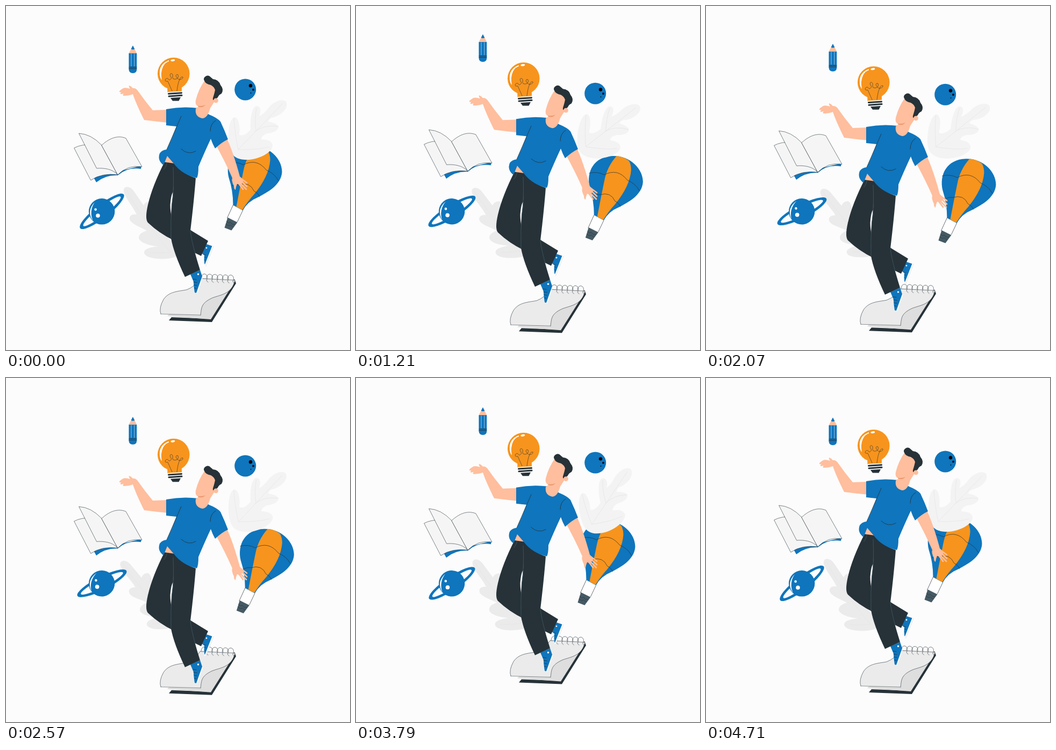
An HTML page with a canvas for the animation above (4780 ms loop, 640 px wide and 640 px high).

```html
<!DOCTYPE html>
<html lang="en">
<head>
<meta charset="utf-8">
<title>Floating ideas</title>
<style>
html, body { margin: 0; width: 100%; height: 100%; overflow: hidden; background: #fcfcfc; }
canvas { display: block; width: 100vmin; height: 100vmin; }
</style>
</head>
<body>
<canvas id="stage" width="640" height="640"></canvas>
<script>
const ctx = document.getElementById('stage').getContext('2d');
const LOOP = 4780, FRAME = 70, LEAD = 50, TAU = Math.PI * 2;
const BLUE = '#0f75bc', ORANGE = '#f7941d', DARK = '#263238', SKIN = '#ffbe9d', SLATE = '#455a64';
const PAPER = '#f5f5f5', PALE = '#f3f3f3', GREY = '#ebebeb';

const fill = (d, color) => { ctx.fillStyle = color; ctx.fill(new Path2D(d)); };
const line = (d, color = DARK, width = 0.6) => {
  ctx.strokeStyle = color;
  ctx.lineWidth = width;
  ctx.stroke(new Path2D(d));
};
const outlined = (d, color) => { fill(d, color); line(d); };
const dot = (x, y, r, color) => {
  ctx.fillStyle = color;
  ctx.beginPath();
  ctx.arc(x, y, r, 0, TAU);
  ctx.fill();
};

// Draws a part shifted by (dx, dy), or turned by deg around (px, py).
const shifted = (dx, dy, draw) => {
  ctx.save();
  ctx.translate(dx, dy);
  draw();
  ctx.restore();
};
const turned = (px, py, deg, draw) => {
  ctx.save();
  ctx.translate(px, py);
  ctx.rotate(deg * Math.PI / 180);
  ctx.translate(-px, -py);
  draw();
  ctx.restore();
};

const ease = p => (1 - Math.cos(Math.PI * p)) / 2;
const wave = (t, period) => ease(2 * (t + LEAD) / period);
const track = (t, keys) => {
  for (let i = 1; i < keys.length; i++) {
    const [t0, a] = keys[i - 1], [t1, b] = keys[i];
    if (t <= t1) return a + (b - a) * ease((t - t0) / (t1 - t0));
  }
  return keys[keys.length - 1][1];
};

function darkLeaf() {
  fill('M219 341C222 333 233 336 239 346L256 371C258 367 262 363 269 364C276 368 274 384 277 395C282 410 300 430 318 448C324 458 322 468 300 470C280 472 258 468 257 459C257 451 270 449 283 447C270 447 247 440 247 431C247 423 256 420 262 418C245 409 230 404 230 395C230 388 238 387 243 388C236 372 217 352 219 341Z', GREY);
  line('M224 342Q250 392 306 458M268 459Q290 460 306 458', '#e4e4e4');
}

function balloon() {
  fill('M443 389Q443 362 435 338C428 308 443 280 478 279C510 278 534 303 534 327C533 352 505 366 490 374Q470 382 461 399Z', BLUE);
  fill('M485 279Q467 299 462 326Q455 360 449 392L460 398Q470 382 482 369Q510 335 512 305Q512 295 508 288Q498 280 485 279Z', ORANGE);
  line('M434 311Q448 307 462 314Q487 301 505 324Q520 330 527 343M441 353Q447 350 454 351Q474 345 482 363Q490 367 492 373', DARK, 0.7);
  fill('M443 390L461 399L451 420L433 412Z', '#fff');
  line('M443 389L432 413M461 399L451 420', DARK, 0.7);
  fill('M433 412L451 421L440 436L427 431Z', SLATE);
  line('M431 419Q434 424 438 421Q441 426 446 425M430 424Q434 429 438 426Q441 430 443 429');
}

function paleLeaf() {
  fill('M521 178C514 171 497 178 488 190C481 199 475 203 471 205C475 195 474 186 466 186C457 188 454 210 455 230C446 240 438 243 434 239C436 228 434 207 425 207C415 209 411 240 416 264C420 282 434 287 452 286C475 284 498 270 496 258C493 250 486 249 475 248C475 243 480 239 487 237C497 236 506 232 507 225C506 219 496 217 488 215C490 210 492 208 498 207C512 203 527 190 521 178Z', PALE);
  line('M432 267L514 182M424 209Q426 240 432 267Q470 268 490 262M466 190Q462 212 465 232M463 234Q480 220 506 224', '#e6e6e6', 0.8);
}

function pencil() {
  fill('M233 79.5L228.5 88H243.3L239 79.5Z', SKIN);
  fill('M236 73.5L232.6 80Q236 82 239.4 80Z', BLUE);
  fill('M228.5 88V118Q229 125 236 125Q243 125 243.3 118V88Z', BLUE);
  line('M233 89V112M238.8 89V112', '#dbe8f2', 0.7);
  line('M229 114H243M229 116.5H243', DARK, 0.9);
}

function bulb() {
  dot(311.8, 125.8, 29.8, ORANGE);
  fill('M300 148L300.5 161L327 159.5V148Z', ORANGE);
  fill('M303 101Q284 108 286 128Q287 135 290 138Q287 124 292 113Q296 105 303 103Z', '#fff');
  ctx.fillStyle = '#fff';
  ctx.beginPath();
  ctx.ellipse(310.3, 101, 4, 1.9, -0.15, 0, TAU);
  ctx.fill();
  line('M309 158L301 140Q295 141 296.5 136.5Q300 133 302 136Q304 140 308 134Q303 127 307 125.5Q311 126 310 131Q309 137 316 136Q322 134 320 128Q317 126 316 130Q317 134 322 137Q330 136 329 132Q325 131 323 137Q320 142 318 158');
  fill('M301 160L327 158.5L325 170L306 172Z', '#fff');
  line('M302.5 163.3L326.5 161.7M303 168L327 166.3', DARK, 3);
  fill('M306 171L325 169.7L321.5 176.5H310Z', DARK);
}

function moon() {
  dot(445.2, 155.4, 20, BLUE);
  dot(455, 148.2, 3.2, '#000');
  dot(460, 155.7, 1.9, '#000');
  dot(455.5, 161.8, 0.9, '#000');
}

function planet() {
  const tilt = -37.9 * Math.PI / 180;
  ctx.fillStyle = BLUE;
  ctx.beginPath();
  ctx.ellipse(178.5, 382, 51.3, 12.5, tilt, 0, TAU);
  ctx.ellipse(178.5, 382, 44, 7.5, tilt, 0, TAU);
  ctx.fill('evenodd');
  dot(178.2, 382.3, 24.2, BLUE);
  fill('M165 365Q149 382 162 400Q154 382 165 365Z', '#fff');
  dot(166.6, 378.6, 2.3, '#fff');
  dot(171, 390, 3.8, '#fff');
}

function book() {
  fill('M163 319L168 328Q185 314 208 315Q226 299 251 303L252 297L208 308Z', BLUE);
  outlined('M127 264Q140 257 160 258L208 314Q178 310 158 324Z', PAPER);
  outlined('M136 237Q158 238 178 259L208 314C198 303 182 301 169 302Z', PAPER);
  outlined('M178 259C190 248 206 239 223 246L253 299Q226 295 208 314Z', PAPER);
}

function notepad() {
  fill('M308 579L303 585L383 588L428 516L425 508L381 582Z', DARK);
  fill('M300 577L381 583L426 512L362 506Z', '#dedede');
  const page = 'M288 573Q284 562 293 546C303 531 320 531 336 528Q352 522 361 507L426 510C420 536 400 537 384 543C362 553 364 562 362 575';
  fill(page, GREY);
  line(page);
  line('M288 573L362 575', DARK, 0.5);
  for (let i = 0; i < 6; i++) {
    shifted(i * 9.8, i * 0.4, () => line('M363 506Q364 498 370 498.5Q377 501 373 511L376 514'));
  }
}

function shoes() {
  fill('M373 443L386 446L371.5 484L369 482L369 462L365 460Z', '#fff');
  fill('M373 443L383.5 446.5L370 481Q368 478 369 464L364 460Z', BLUE);
  line('M386 447L371.5 484', '#c8c8c8', 0.5);
  line('M368 462L372 463M369 467L372 468M369 472L371 473');
  dot(373, 450, 1.4, '#fff');
  fill('M343 499L361 491L365 503L354 534L351 533Q349 520 349 513Z', BLUE);
  line('M365.7 504L355 534.5', '#fff', 1.4);
  line('M348 508L354 509M349 513.5L355 514.5M350 519L355 520M350.5 524.5L354 525.5', DARK, 0.8);
  dot(357.5, 499, 1.7, '#fff');
}

function legs() {
  fill('M296 288L315 292L311 346Q307 350 305.5 370Q305.5 382 308 391L345 418L376 437L363 465Q335 452 312 436Q285 423 264 403Q258 396 264 370Q272 335 296 288Z', DARK);
  fill('M311 291Q330 313 353 320Q350 360 343 418Q345 440 361 491L333 504Q312 460 307 432Q306 400 308.5 370Q313 340 311 300Z', DARK);
  line('M311 300Q313 340 308.5 370Q306 400 307 432M343 418Q345 436 352 460M300 290Q298 299 294 304', SLATE, 0.8);
}

function torso() {
  fill('M299 277L293 290L314 293Z', SKIN);
  fill('M298 192Q328 186 358 190L378 202Q393 208 399 215Q407 232 413 248Q402 253 389 265Q384 256 381 247Q368 275 358 299Q358 315 355 320Q328 314 312 293L300 279Q298 284 293 296Q281 287 286 274Q290 268 299 267Q309 246 317 224Q307 223 298 222Z', BLUE);
  line('M326 205L299 267M380 233Q380 219 390 213M326 266Q339 278 353 270', DARK, 0.8);
}

function arms() {
  fill('M301 193L273 194Q258 176 244 156Q240 152 236 153Q233 149 229 148Q228 150 231 154Q222 151 218 153Q211 157 210.5 159.5Q213 161 215 160Q211 163 214 164L219 163Q216 166 219 167Q229 167 236 164Q242 182 257 212Q280 215 301 217Z', SKIN);
  fill('M388 254L409 242Q423 272 435 317L442 325L436 333L430 331Q428 335 427 342Q424 341 424 335Q419 325 421 320Q408 290 388 254Z', SKIN);
  line('M436 320L448 329M437 325L448 335.5M434 328L447 341M432 329L441 341', SKIN, 2.7);
}

function head() {
  fill('M370 138Q358 155 353 175Q351 184 358 187L353 191Q351 206 365 209Q375 209 380 190L387 179L392 150Q385 138 370 138Z', SKIN);
  fill('M357 185.5Q365 187 371 184Q366 190 358 187.5Z', '#eb996e');
  fill('M369 133Q373 128 378 130L385 136Q396 137 399 147Q406 155 401 163Q396 165 394 170Q390 174 388 175Q384 176 385 171Q388 162 389 156Q387 150 381 147Q371 145 369 139Q367 136 369 133Z', DARK);
  dot(390.5, 175.8, 4.4, SKIN);
}

function man() {
  shoes();
  legs();
  arms();
  torso();
  head();
}

function render(t) {
  const slow = wave(t, LOOP);
  const drift = track(t, [[0, 0], [1750, 1], [4710, 0]]);

  ctx.fillStyle = '#fcfcfc';
  ctx.fillRect(0, 0, 640, 640);
  ctx.lineCap = 'round';
  ctx.lineJoin = 'round';

  turned(258, 410, -5.8 * slow, darkLeaf);
  shifted(26.5 * drift - 20.5, 24.3 * drift - 18.6, balloon);
  turned(466, 232, track(t, [[0, 0], [1640, 10], [3430, -12], [4710, 0]]), paleLeaf);
  shifted(0, -21 * wave(t, LOOP / 2), pencil);
  shifted(0, 17 * slow, bulb);
  shifted(0, 9.5 * drift, moon);
  turned(178.5, 382, 11 * slow, planet);
  shifted(0, track(t, [[0, 0], [1550, -7.7], [3250, 8.7], [4710, 0]]), book);
  shifted(0, track(t, [[0, 0], [1640, 24.5], [3430, -22.3], [4710, 0]]), notepad);
  shifted(0, 34.5 * slow, man);
}

const start = performance.now();
function tick() {
  const t = (performance.now() - start) % LOOP;
  render(Math.floor(t / FRAME) * FRAME);
  requestAnimationFrame(tick);
}
tick();
</script>
</body>
</html>
```
